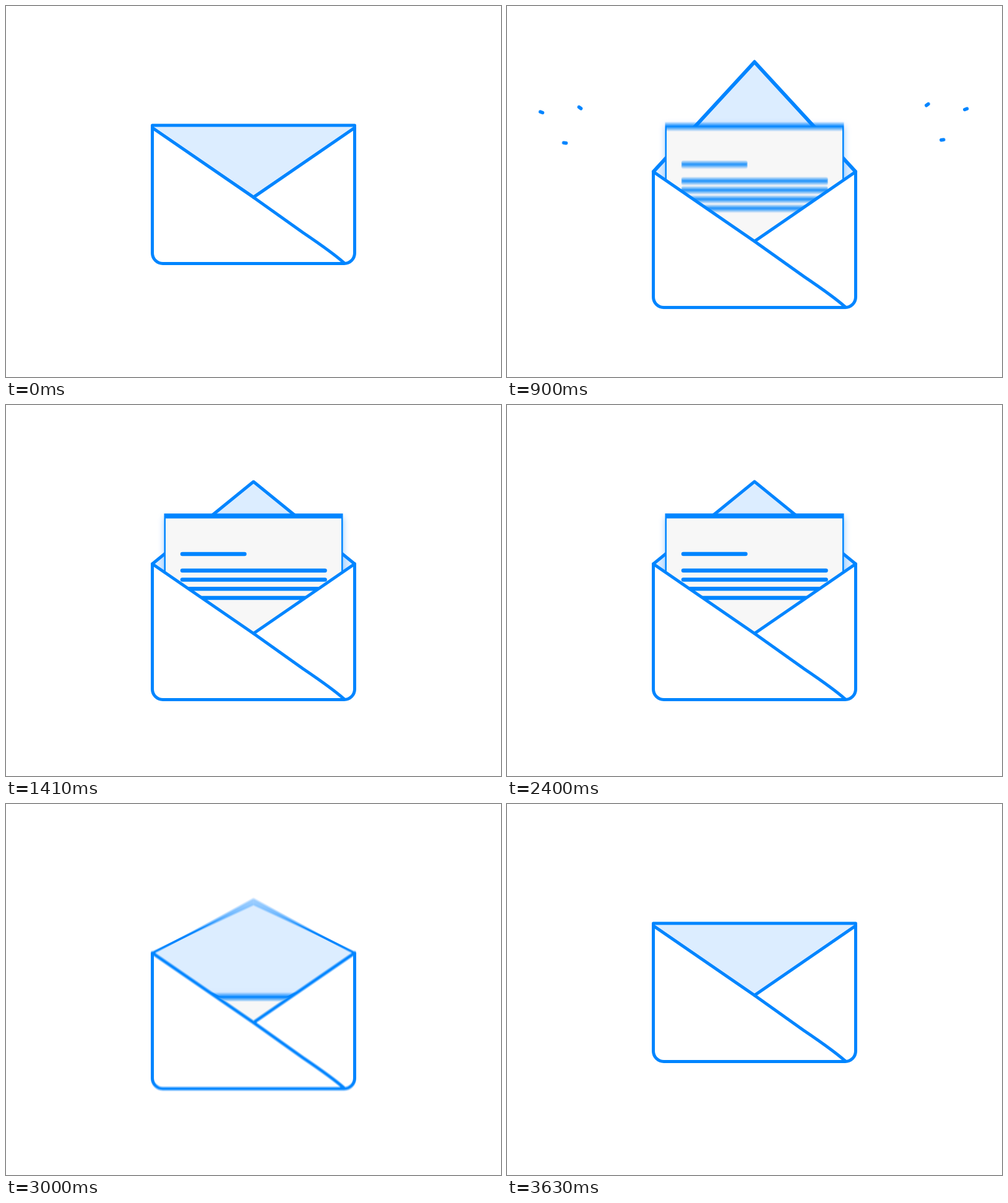
Animation, 800 px wide and 600 px high, one loop 4.14 s. Source, as an HTML page with a canvas:

```html
<!DOCTYPE html>
<html lang="en">
<head>
<meta charset="utf-8">
<title>Envelope</title>
<style>
  html, body { margin: 0; width: 100%; height: 100%; overflow: hidden; background: #fff; }
  canvas { display: block; }
</style>
</head>
<body>
<canvas id="stage" width="800" height="600"></canvas>
<script>
const LOOP = 4140, STEP = 30, SHUTTER = 16, SAMPLES = 12;
const BLUE = '#0085ff', PALE = '#dcedff', PAPER = '#f7f7f7';
const LEFT = 236.5, RIGHT = 563.5, MID = 400, HINGE = 197, FLAP_HEIGHT = 133;
const OPENING = { start: 0, swing: 377, end: 1285 };
const CLOSING = { start: 2385, swing: 2815, end: 3640 };
const SWING_TIME = 480, SPARK_LENGTH = 22;

const stage = document.getElementById('stage').getContext('2d', { alpha: false });
const layer = document.createElement('canvas');
layer.width = 800;
layer.height = 600;
const ctx = layer.getContext('2d', { alpha: false });
ctx.lineJoin = ctx.lineCap = 'round';

const mix = (a, b, p) => a + (b - a) * p;

const smooth = (t, from, to) => {
  const u = Math.min(1, Math.max(0, (t - from) / (to - from)));
  return u * u * (3 - 2 * u);
};

// Goes from 0 to 1: winds up, swings past the goal, settles.
function turn(t, { start, swing, end }, lag, over) {
  const from = swing + lag, to = from + SWING_TIME;
  return (1 + 2 * over) * smooth(t, from, to) - over * (smooth(t, start, from) + smooth(t, to, end + lag));
}

// How far a part is open; each part may lag behind or lead the body.
const openness = (t, openLag, closeLag, over) =>
  turn(t, OPENING, openLag, over) - turn(t, CLOSING, closeLag, over);

function shape(path, { fill, width }) {
  const p = new Path2D(path);
  if (fill) {
    ctx.fillStyle = fill;
    ctx.fill(p);
  }
  if (width) {
    ctx.strokeStyle = BLUE;
    ctx.lineWidth = width;
    ctx.stroke(p);
  }
}

function drawBack(flap) {
  const half = MID - LEFT;
  const rim = `M${LEFT} ${HINGE}V${HINGE - 2.3 + flap / 66}H${RIGHT}V${HINGE}`;
  shape(`M${LEFT} ${HINGE}H${RIGHT}L${MID} 311Z`, { fill: PALE });
  if (flap < 0) shape(rim, { fill: PALE });
  ctx.save();
  ctx.translate(MID, HINGE);
  ctx.scale(1, flap / FLAP_HEIGHT);
  shape(`M${-half} 0L0 ${-FLAP_HEIGHT}L${half} 0`, { fill: PALE, width: 5 });
  ctx.restore();
  if (flap < 0) shape(rim, { width: 5 });
}

function drawLetter(top) {
  ctx.save();
  ctx.beginPath();
  ctx.rect(0, -200, 800, 605);
  ctx.clip();
  ctx.translate(0, top);
  ctx.save();
  ctx.shadowColor = 'rgba(0, 133, 255, 0.4)';
  ctx.shadowBlur = 10;
  ctx.shadowOffsetY = 6;
  shape('M255.5 0H544.5V215H255.5Z', { fill: BLUE });
  ctx.restore();
  shape('M258 8H542V215H258Z', { fill: PAPER });
  shape('M285 65.5H385.5', { width: 6.5 });
  for (let row = 0; row < 4; row++) {
    shape(`M285 ${92.3 + 14.75 * row}H515.5`, { width: 6.5 });
  }
  ctx.restore();
}

function drawFront() {
  const sides = `V399.5A17 17 0 0 1 546.5 416.5H253.5A17 17 0 0 1 ${LEFT} 399.5V${HINGE}`;
  const fold = `L${MID} 309.5L480 366.5Q528 399 546.5 415.5`;
  shape(`M${LEFT} ${HINGE}L${MID} 309.5L${RIGHT} ${HINGE}${sides}Z`, { fill: '#fff' });
  shape(`M${RIGHT} ${HINGE}${sides}${fold}M${MID} 309.5L${RIGHT} ${HINGE}`, { width: 5 });
}

function drawSpark(x, y, degrees, head, tail) {
  const dx = Math.cos(degrees * Math.PI / 180), dy = Math.sin(degrees * Math.PI / 180);
  shape(`M${x - dx * tail} ${y - dy * tail}L${x - dx * head} ${y - dy * head}`, { width: 5.5 });
}

function drawSparks(t) {
  const head = SPARK_LENGTH * smooth(t, 835, 1080);
  const tail = SPARK_LENGTH * smooth(t, 1050, 1400);
  if (head <= tail) return;
  for (const [x, y, degrees] of [[57.5, 172.5, 21], [119.5, 165.8, 37], [95.5, 221.8, 9]]) {
    drawSpark(x, y, degrees, head, tail);
    drawSpark(797.3 - x, y - 5, 180 - degrees, head, tail);
  }
}

function drawScene(t) {
  ctx.fillStyle = '#fff';
  ctx.fillRect(0, 0, 800, 600);
  drawSparks(t);
  ctx.save();
  ctx.translate(0, 60 * openness(t, 0, 0, 0.19));
  drawBack(mix(-112, FLAP_HEIGHT, openness(t, 10, 16, 0.185)));
  drawLetter(mix(326, 115.5, openness(t, 137, -111, 0.1)));
  drawFront();
  ctx.restore();
}

// Motion blur: average several moments while the shutter is open.
function render(t) {
  const moving = (t > OPENING.start && t < 1410) || (t > CLOSING.start && t < CLOSING.end);
  const count = moving ? SAMPLES : 1;
  for (let i = 0; i < count; i++) {
    drawScene(t + SHUTTER * ((i + 0.5) / count - 0.5));
    stage.globalAlpha = 1 / (i + 1);
    stage.drawImage(layer, 0, 0);
  }
}

let start, shown = -1;
function tick(now) {
  start ??= now;
  const t = Math.floor(((now - start) % LOOP) / STEP) * STEP;
  if (t !== shown) render(shown = t);
  requestAnimationFrame(tick);
}
render(0);
requestAnimationFrame(tick);
</script>
</body>
</html>
```
